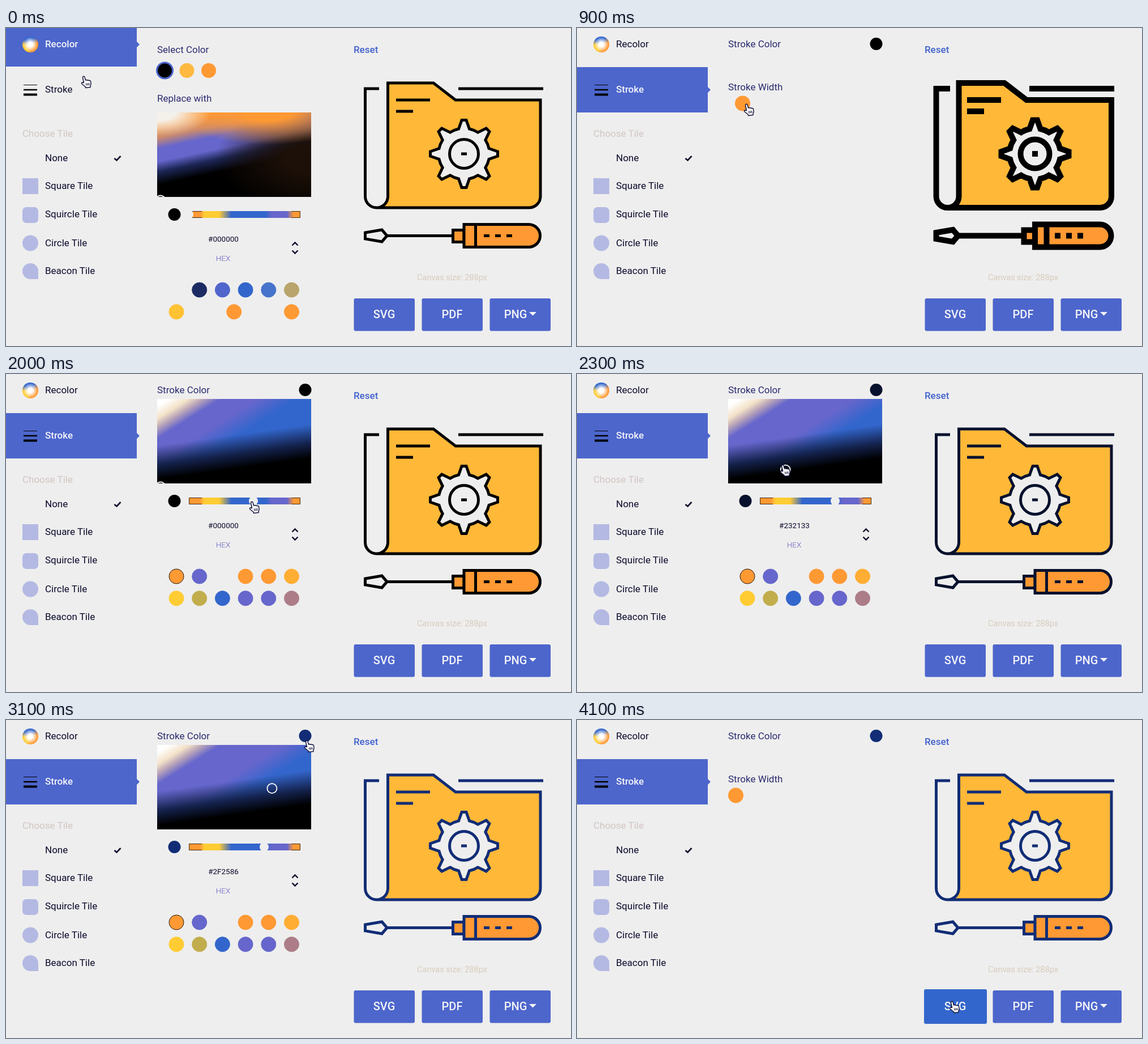
An HTML page for the animation above (4.3 s loop, 998 by 561 pixels).

```html
<!DOCTYPE html>
<html lang="en">
<head>
<meta charset="utf-8">
<title>Icon editor</title>
<style>
  html, body { margin: 0; width: 100%; height: 100%; overflow: hidden; background: #eee; }
  svg { display: block; }
  text { font: 17px Roboto, sans-serif; fill: #0a0a2c; }
  .head { fill: #2b2a70; }
  .faint { fill: #d2c6c3; }
  .mid { text-anchor: middle; }
  .btn text { font-size: 20px; font-weight: 500; fill: #f4f4f8; }
  .on { fill: #f4f4f8; font-weight: 500; }
  .wheel, #field { width: 100%; height: 100%; }
  .wheel {
    border-radius: 50%;
    background: radial-gradient(#fff 20%, #fff0 65%),
      conic-gradient(#36c 8%, #f93 22%, #f93 48%, #fc3 58%, #fc3 74%, #36c 86%);
  }
</style>
</head>
<body>
<svg width="998" height="561" viewBox="0 0 998 561">
  <defs>
    <linearGradient id="hues">
      <stop stop-color="#f93"/><stop offset=".1" stop-color="#f93"/>
      <stop offset=".14" stop-color="#fc3"/><stop offset=".27" stop-color="#fc3"/>
      <stop offset=".38" stop-color="#36c"/><stop offset=".69" stop-color="#36c"/>
      <stop offset=".74" stop-color="#66c"/><stop offset=".88" stop-color="#66c"/>
      <stop offset=".94" stop-color="#f93"/>
    </linearGradient>
    <clipPath id="fieldClip"><path d="M267 44H539V193H267Z"/></clipPath>
  </defs>

  <!-- sidebar -->
  <path id="tab" fill="#4d66cc"/>
  <foreignObject x="29" y="15" width="28" height="28"><div class="wheel"></div></foreignObject>
  <text id="recolor" x="69" y="34">Recolor</text>
  <path d="M31 100.5H55" stroke="#000"/>
  <path d="M31 109H55" stroke="#000" stroke-width="2.5"/>
  <path d="M31 117.5H55" stroke="#000" stroke-width="4"/>
  <text id="stroke" x="69" y="114">Stroke</text>
  <text class="faint" x="29" y="192">Choose Tile</text>
  <text x="69" y="235">None</text>
  <path d="M191.500 230l4 3.500 7-7.500" fill="none" stroke="#0a0a2c" stroke-width="2.600"/>
  <g fill="#b4b9e3">
    <rect x="29" y="265" width="28" height="28"/>
    <rect x="29" y="316" width="28" height="28" rx="7"/>
    <circle cx="43" cy="379.500" r="14"/>
    <path d="M57 443H43a14 14 0 1 1 14-14Z"/>
  </g>
  <text x="69" y="284">Square Tile</text>
  <text x="69" y="334">Squircle Tile</text>
  <text x="69" y="385">Circle Tile</text>
  <text x="69" y="434">Beacon Tile</text>

  <!-- recolor panel -->
  <g id="recolorPanel">
    <text class="head" x="267" y="43.500">Select Color</text>
    <circle cx="280.500" cy="75" r="14" stroke="#4d66cc" stroke-width="3"/>
    <circle cx="319.500" cy="75" r="13" fill="#ffb940"/>
    <circle cx="358" cy="75" r="13" fill="#f93"/>
    <text class="head" x="267" y="130">Replace with</text>
  </g>

  <!-- stroke panel -->
  <g id="strokePanel">
    <text class="head" x="267" y="34">Stroke Color</text>
    <circle class="ink" cx="528.500" cy="28" r="11"/>
    <g id="widthPanel">
      <text class="head" x="267" y="110">Stroke Width</text>
      <circle id="knob" cy="133" r="13.500" fill="#f93"/>
    </g>
  </g>

  <!-- colour picker -->
  <g id="picker">
    <foreignObject x="267" y="44" width="272" height="149"><div id="field"></div></foreignObject>
    <g clip-path="url(#fieldClip)">
      <circle id="ring" r="8.500" fill="none" stroke="#fff" stroke-width="1.800"/>
    </g>
    <circle class="ink" cx="297.500" cy="224" r="11"/>
    <rect x="323" y="218" width="197" height="12" fill="url(#hues)"/>
    <path d="M346 218.500H323.500V229.500H346M504 218.500H519.500V229.500H504" fill="none" stroke="#432a18"/>
    <circle id="hue" cy="224" r="8" fill="#eee"/>
    <text id="hex" class="mid" x="384" y="272" style="font-size:13.500px"></text>
    <text class="mid" x="383.500" y="305.500" style="font-size:13.500px;font-weight:300;fill:#6058c0">HEX</text>
    <path d="M505.500 278.500l5-5 5 5M505.500 287.500l5 5 5-5" fill="none" stroke="#0a0a2c" stroke-width="2.400"/>
    <g id="dotsA"></g>
    <g id="dotsB"></g>
  </g>

  <!-- preview -->
  <text x="614" y="43.500" style="fill:#4161cc;font-weight:500">Reset</text>
  <g id="art" fill="none">
    <path fill="#eee" stroke="none" d="M635 107H675V297a20 20 0 0 1-40 0Z"/>
    <path fill="#ffb838" stroke="none" d="M674.500 97H755L794 127H944V297a20 20 0 0 1-20 20H655a20 20 0 0 0 19.500-20Z"/>
    <path d="M655 317a20 20 0 0 0 19.500-20V97H755L794 127H944V297a20 20 0 0 1-20 20H655a20 20 0 0 1-20.500-20V107H659"/>
    <path d="M799 107H949M689 127H749M689 147H719"/>
    <path id="gear" fill="#eee"/>
    <circle cx="809" cy="222" r="25.500"/>
    <path d="M804 222h10"/>
    <path fill="#eee" d="M634.500 361L664 356 673 366.500 664 377 634.500 372Z"/>
    <path d="M673 366.500H789"/>
    <path fill="#f93" d="M789.500 356.500H809V377.500H789.500Z"/>
    <path fill="#f93" d="M809 346.500H923.500a20 20 0 0 1 0 40H809Z"/>
    <path d="M829.500 346.500V386.500M844 366.500h10M864 366.500h10M884 366.500h10"/>
  </g>
  <text class="mid" x="788" y="445" style="font-size:14.500px;fill:#d8cbbb">Canvas size: 288px</text>

  <g class="btn" fill="#4d66cc">
    <rect id="svgBtn" rx="3"/>
    <rect x="734.500" y="477" width="107.500" height="57.500" rx="3"/>
    <rect x="854.500" y="477" width="107.500" height="57.500" rx="3"/>
    <text class="mid" x="668" y="512">SVG</text>
    <text class="mid" x="788" y="512">PDF</text>
    <text class="mid" x="900" y="512">PNG</text>
    <path d="M924 501h13l-6.500 6.500Z" fill="#f4f4f8"/>
  </g>

  <g id="hand" stroke="#14143c" stroke-width="1.500" stroke-linejoin="round">
    <path fill="#fff" d="M3.500 2.500a1.800 1.800 0 0 1 3.600-.6L8.500 7q1.800-1 3 .3q2-.9 3.100.4q2.300-.6 2.900 1.300L18 13q.2 2-1 4V19.500L8.500 20.500V19L2 13.500q-1.200-1.800.4-2.600L5.500 11.500Z"/>
    <path d="M9.500 12.500l.5 4M12 12.200l.5 4M14.400 12l.5 4" stroke-width="1.200"/>
  </g>
  <path id="arrow" fill="#0a0a18" stroke="#fff" stroke-width="1.200" d="M0 0V17L4 13.500 7 20.500 10 19 7 12.500H12Z"/>
</svg>

<script>
const $ = id => document.getElementById(id);
const LOOP = 4300;

// Each step changes only the values it names and holds until the next one.
// x, y: pointer; knob, width: stroke slider; hue, s, v: picker position.
const steps = [
  [0, { mode: 'recolor', x: 132, y: 85, arrow: 0, width: 5, knob: 280.5, open: 0, hue: 323, s: 0, v: 0, hover: 0 }],
  [200, { mode: 'stroke' }],
  [400, { x: 250, y: 124, arrow: 1 }],
  [500, { x: 294, y: 134, arrow: 0, knob: 292.5, width: 10 }],
  [700, { x: 306, knob: 304.5, width: 15 }],
  [900, { x: 294, knob: 292.5, width: 10 }],
  [1100, { x: 282, knob: 280.5, width: 5 }],
  [1300, { x: 440, y: 68, arrow: 1 }],
  [1400, { x: 530, y: 29, open: 1 }],
  [1500, { x: 500, y: 80 }],
  [1600, { x: 430, y: 145 }],
  [1700, { x: 355, y: 205 }],
  [1800, { x: 315, y: 225, arrow: 0 }],
  [1900, { x: 387, hue: 395 }],
  [2000, { x: 429, hue: 437 }],
  [2100, { x: 448, hue: 456 }],
  [2300, { x: 358, y: 160, s: .35, v: .2 }],
  [2500, { x: 440, y: 134, s: .65, v: .38 }],
  [2700, { x: 472, y: 122, s: .769, v: .4588 }],
  [2900, { x: 460, y: 112, s: .7239, v: .5255 }],
  [3100, { x: 526, y: 36 }],
  [3200, { x: 540, y: 70, arrow: 1, open: 0 }],
  [3300, { x: 562, y: 160 }],
  [3400, { x: 590, y: 270 }],
  [3500, { x: 618, y: 375 }],
  [3600, { x: 640, y: 450 }],
  [3700, { x: 652, y: 488, arrow: 0, hover: 1 }],
  [3800, { x: 655, y: 493 }],
  [3900, { x: 657, y: 496 }],
];

const dots = (id, list) => {
  $(id).innerHTML = list.map(([col, row, fill, line]) =>
    `<circle cx="${301 + col * 40.7}" cy="${357 + row * 38.7}" r="13" fill="${fill}" stroke="${line || fill}"/>`).join('');
};
dots('dotsA', [
  [1, 0, '#1c2b62'], [2, 0, '#5166cc'], [3, 0, '#36c'], [4, 0, '#4673cc'], [5, 0, '#b8a46c'],
  [0, 1, '#ffc233'], [2.5, 1, '#f93'], [5, 1, '#f93'],
]);
dots('dotsB', [
  [0, 0, '#f93', '#2a1a10'], [1, 0, '#66c'], [3, 0, '#f93'], [4, 0, '#f93'], [5, 0, '#ffad33'],
  [0, 1, '#fc3'], [1, 1, '#c2ad4c'], [2, 1, '#36c'], [3, 1, '#66c'], [4, 1, '#66c'], [5, 1, '#ac7d88'],
]);

// Eight tapered teeth joined by arcs of the gear's body.
let gear = '';
for (let i = 0; i < 8; i++) {
  const c = Math.cos(i * Math.PI / 4), s = Math.sin(i * Math.PI / 4);
  const at = (r, w) => `${(809 + r * c - w * s).toFixed(2)} ${(222 + r * s + w * c).toFixed(2)}`;
  gear += `${i ? 'A45 45 0 0 1 ' : 'M'}${at(44, -9.5)}L${at(59.5, -4)}L${at(59.5, 4)}L${at(44, 9.5)}`;
}
$('gear').setAttribute('d', gear + 'A45 45 0 0 1 853 212.5Z');

const warmField = 'radial-gradient(95px 42px at 0 0, #f4f0ea 35%, #f6dcb400),' +
  'radial-gradient(60% 38% at 72% 0, #f93 25%, #f930),' +
  'radial-gradient(62% 65% at 100% 55%, #1d1008 25%, #1d100800),' +
  'linear-gradient(168deg, #f93 10%, #c98a70 22%, #66c 31%, #66c 42%, #1c2655 51%, #000 62%)';
const coolField = hue => {
  const shift = (hue - 437) * .47;
  return 'linear-gradient(172deg, #14224d00 44%, #14224d 62%, #000 76%),' +
    `linear-gradient(148deg, #fff 4%, #f3e2c8 11%, #b9a4b8 16%, #66c 22%, #66c ${35 + shift}%, #36c ${48 + shift}%)`;
};

function hexOf(s, v) {
  const blue = v * 255, green = blue * (1 - s), red = green + (blue - green) * .1;
  return '#' + [red, green, blue].map(n => Math.round(n).toString(16).padStart(2, '0')).join('').toUpperCase();
}

const set = (id, attrs) => {
  for (const k in attrs) $(id).setAttribute(k, attrs[k]);
};
const show = (id, on) => set(id, { display: on ? 'inline' : 'none' });

function draw(t) {
  const st = Object.assign({}, ...steps.filter(([at]) => at <= t).map(([, change]) => change));
  const recolor = st.mode === 'recolor';
  const ink = `rgb(${st.v * 35},${st.v * 85},${st.v * 225})`;

  set('tab', { d: recolor ? 'M0 0H231V24l5 5-5 5V68H0Z' : 'M0 69H231V104l5 5-5 5V149H0Z' });
  set('recolor', { class: recolor ? 'on' : '' });
  set('stroke', { class: recolor ? '' : 'on' });
  show('recolorPanel', recolor);
  show('strokePanel', !recolor);
  show('widthPanel', !st.open);
  show('picker', recolor || st.open);
  show('dotsA', recolor);
  show('dotsB', !recolor);
  set('picker', { transform: `translate(0 ${recolor ? 105 : 0})` });

  set('knob', { cx: st.knob });
  set('hue', { cx: st.hue });
  set('ring', { cx: 273 + st.s * 272, cy: 50 + (1 - st.v) * 149 });
  $('field').style.background = st.hue > 360 ? coolField(st.hue) : warmField;
  $('hex').textContent = hexOf(st.s, st.v);
  document.querySelectorAll('.ink').forEach(el => el.setAttribute('fill', ink));
  set('art', { stroke: ink, 'stroke-width': st.width });

  set('svgBtn', st.hover
    ? { x: 613, y: 475, width: 111, height: 61, fill: '#36c' }
    : { x: 614.5, y: 477, width: 107.5, height: 57.5, fill: '#4d66cc' });

  show('hand', !st.arrow);
  show('arrow', st.arrow);
  set(st.arrow ? 'arrow' : 'hand', { transform: `translate(${st.x} ${st.y})` });
}

const start = performance.now();
function tick() {
  draw((performance.now() - start) % LOOP);
  requestAnimationFrame(tick);
}
tick();
</script>
</body>
</html>
```
